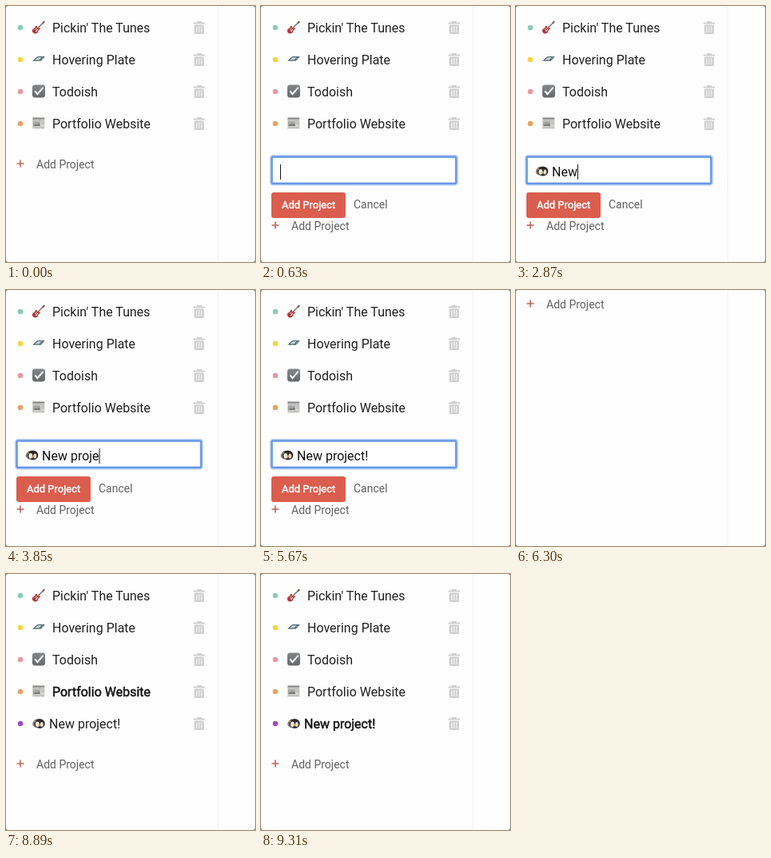
Animation of 312 by 320 pixels, one loop 9380 ms. Source, as an HTML page:

```html
<!DOCTYPE html>
<html lang="en">
<head>
<meta charset="utf-8">
<title>Project list</title>
<style>
html, body { margin: 0; width: 100%; height: 100%; overflow: hidden; background: #fefefe; }
svg { display: block; width: 312px; height: 320px; font-family: Roboto, Arial, sans-serif; }
.name { font-size: 16px; fill: #202020; }
.bold { fill: #151515; stroke: #151515; stroke-width: .5px; }
.small { font-size: 14px; fill: #606060; }
.button { font-size: 13px; fill: #fff; stroke: #fff; stroke-width: .45px; }
</style>
</head>
<body>
<svg id="stage" viewBox="0 0 312 320" xmlns="http://www.w3.org/2000/svg">
  <defs>
    <linearGradient id="steel" x2="0" y2="1">
      <stop stop-color="#85878a"/><stop offset="1" stop-color="#656769"/>
    </linearGradient>
    <g id="trash" fill="#cfcfcf">
      <path d="M-3 -6.5V-8H3V-6.5H7V-4.6H-7V-6.5Z"/>
      <path d="M-6 -3.6H6V6.5Q6 8 4.5 8H-4.5Q-6 8 -6 6.5Z"/>
      <path d="M-3 -1.8V6M0 -1.8V6M3 -1.8V6" stroke="#fafafa" stroke-width="1.1"/>
    </g>
    <g id="guitar">
      <path d="M-2 1.4L5.4 -6" stroke="#8d7771" stroke-width="1.5"/>
      <path d="M4.2 -6L6.2 -8.6L8 -7.4L6 -4.6Z" fill="#77625d"/>
      <path d="M-7.8 2.6C-6.8 .6 -5 1.6 -4.6 -.4C-4.2 -2.4 -2.6 -2.8 -2.2 -1.4L-1.6 .8L1.2 .2C2.6 .4 1.8 2.2 .4 2.8C-.8 3.6 -.4 5.4 -1.8 6.6C-3.6 8 -6 7.6 -7.2 6.2C-8.2 5 -8.4 3.8 -7.8 2.6Z" fill="#b93a3d"/>
      <path d="M-4.6 2L-2.8 .4L-1 2.2L-2.2 4.8L-4 5Z" fill="#ecd5d2"/>
      <path d="M-5.4 4.8L-1.6 1" stroke="#6b3432"/>
    </g>
    <g id="saucer">
      <path d="M-7.6 1.8C-5.6 -.8 -3 -3.4 -1 -4H7.6C6.6 -2 4.4 .4 2.4 1.8Z" fill="#566a6b"/>
      <path d="M-4.6 .4C-3.2 -1.2 -1.6 -2.6 -.2 -3H3.4L.6 .4Z" fill="#c3d2d6"/>
      <path d="M2 .3L4.6 -2.9H6L3 .3Z" fill="#76aa9a"/>
    </g>
    <g id="check">
      <rect x="-8" y="-8.5" width="16" height="16" rx="3.4" fill="url(#steel)"/>
      <path d="M-4.6 -.6L-1.6 3.2L5.6 -5.2" fill="none" stroke="#fff" stroke-width="2"/>
    </g>
    <g id="paper">
      <rect x="-8" y="-8" width="15.5" height="14.5" fill="#d3d3d1"/>
      <path d="M-7.5 -6.3H7" stroke="#858584" stroke-width="1.8"/>
      <path d="M-7 -3.8H6.5M3 -1.5H7M3 .5H7M-7 5H6.5" stroke="#b3b3b1"/>
      <rect x="-7" y="-2.6" width="9" height="5.6" fill="#a5a8a6"/>
      <path d="M-7 3L-4 .2L-2 1.8L0 -.6L2 3Z" fill="#747775"/>
    </g>
    <g id="penguin">
      <path d="M-7.8 1C-7.4 -3 -5 -5.6 -1.4 -5.8L-2 5Q-6.4 5.4 -7.8 1Z" fill="#82776b"/>
      <ellipse cx="1.2" cy="0" rx="6.6" ry="6" fill="#2b2a29"/>
      <ellipse cx="-1.6" cy=".8" rx="2.4" ry="3.4" fill="#f0ece3"/>
      <ellipse cx="3.8" cy="1" rx="1.9" ry="3" fill="#e5dfd4"/>
      <path d="M-.4 1.2Q1.2 -.4 2.8 1.2L1.2 4Z" fill="#d99a45"/>
      <path d="M-6 -2.6L-3.6 -4.2L-3.8 -1.4Z" fill="#c99a5c"/>
    </g>
  </defs>
  <rect width="312" height="320" fill="#fefefe"/>
  <path d="M265.5 0V320" stroke="#f2f2f2"/>
  <g id="list"></g>
  <g id="form">
    <rect x="13.5" y="188.5" width="231" height="33" rx="1.5" fill="#fff" stroke="#ddd"/>
    <g id="ring" fill="none">
      <rect x="13" y="188" width="232" height="34.5" rx="2" stroke="#a9c6f6" stroke-width="4.4" opacity=".6"/>
      <rect x="13.5" y="188.5" width="231" height="33.5" rx="1.5" stroke="#6898e6" stroke-width="2.4"/>
    </g>
    <use id="typedIcon" href="#penguin" x="32.5" y="206.5"/>
    <text id="typed" class="name" x="45" y="213" style="fill:#111"></text>
    <rect id="caret" y="198" width="1" height="19" fill="#111"/>
    <rect x="13" y="233" width="93" height="32" rx="3" fill="#db5d4e"/>
    <text class="button" x="26" y="253">Add Project</text>
    <text class="small" x="116" y="253">Cancel</text>
  </g>
  <g id="add">
    <path d="M13.5 -1H22.5M18 -5.5V3.5" stroke="#b9645b" stroke-width="1.6"/>
    <text class="small" x="38" y="5">Add Project</text>
  </g>
  <path d="M0 0H2L0 2ZM312 0V2L310 0ZM0 320V318L2 320ZM312 320H310L312 318Z" fill="#8a8a8a"/>
</svg>
<script>
const LOOP = 9380;
const $ = id => document.getElementById(id);

const projects = [
  ["Pickin' The Tunes", "guitar", "#7cc4ae"],
  ["Hovering Plate", "saucer", "#f0d028"],
  ["Todoish", "check", "#e48a93"],
  ["Portfolio Website", "paper", "#e2964a"],
  ["New project!", "penguin", "#a14cc8"]
];

$("list").innerHTML = projects.map(([name, icon, color], i) => {
  const y = 27 + i * 40;
  return `<g class="row"><circle cx="18" cy="${y}" r="3.3" fill="${color}"/>
    <use href="#${icon}" x="41" y="${y}"/>
    <text class="name" x="${i === 4 ? 54 : 58}" y="${y + 6}">${name}</text>
    <use href="#trash" x="242" y="${y}"/></g>`;
}).join("");

const rows = [...document.querySelectorAll(".row")];
const labels = rows.map(row => row.querySelector("text"));
const dots = rows.map(row => row.querySelector("circle"));
const pen = document.createElement("canvas").getContext("2d");

// Moments at which each character of "New project!" is typed.
const keys = [2310, 2590, 2870, 3010, 3220, 3360, 3500, 3640, 3850, 4130, 4410, 4760];
const iconAt = 1330, spaceAt = 2170;
const edits = [560, iconAt, spaceAt, ...keys.slice(0, -1), 4830];

const show = (node, on) => node.setAttribute("display", on ? "inline" : "none");
const within = (t, a, b) => t >= a && t < b;

function drawForm(t) {
  const open = within(t, 70, 6230);
  show($("form"), open);
  if (!open) return;
  const focus = t < 560 ? 0 : t < 630 ? .5 : t < 5740 ? 1 : t < 5810 ? .5 : 0;
  $("ring").setAttribute("opacity", focus);
  show($("typedIcon"), t >= iconAt);

  const text = projects[4][0].slice(0, keys.filter(k => t >= k).length);
  $("typed").textContent = text;
  pen.font = "16px Roboto, Arial, sans-serif";
  const start = t < iconAt ? 24 : t < spaceAt ? 41 : 45;
  $("caret").setAttribute("x", start + pen.measureText(text).width);

  // The caret stays lit after an edit, then blinks.
  const last = edits.filter(e => t >= e).pop();
  const lit = Math.floor((t - last) / 560) % 2 === 0;
  show($("caret"), last !== undefined && t < 5670 && lit);
}

function drawList(t) {
  show($("list"), !within(t, 6230, 6930));
  show(rows[4], t >= 6930);
  const bold = within(t, 7560, 8540) || t >= 9100 ? 4 : within(t, 8540, 9100) ? 3 : -1;
  const hover = within(t, 7350, 8470) || t >= 8890 ? 4 : within(t, 8470, 8890) ? 3 : -1;
  rows.forEach((row, i) => {
    labels[i].classList.toggle("bold", i === bold);
    dots[i].setAttribute("opacity", i === hover ? 1 : .88);
  });
}

function draw(t) {
  drawForm(t);
  drawList(t);
  const y = t < 70 ? 198 : t < 6230 ? 275 : t < 6930 ? 18 : 238;
  $("add").setAttribute("transform", `translate(0 ${y})`);
}

const begin = performance.now();
function tick() {
  draw((performance.now() - begin) % LOOP);
  requestAnimationFrame(tick);
}
draw(0);
requestAnimationFrame(tick);
</script>
</body>
</html>
```
